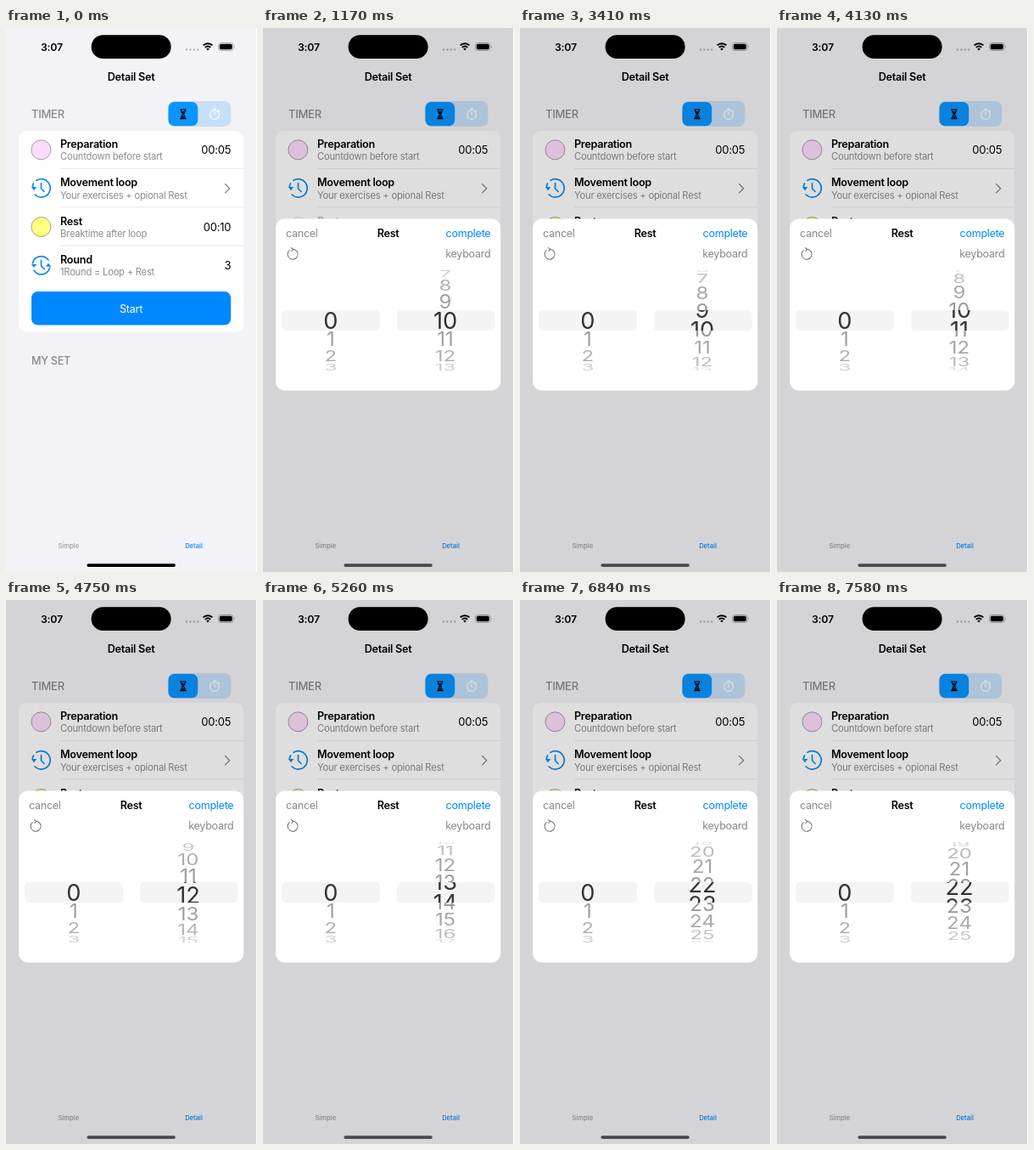
An HTML page that plays this animation: 296x640 px, repeating every 7990 ms.

```html
<!DOCTYPE html>
<html lang="en">
<head>
<meta charset="utf-8">
<title>Detail Set</title>
<style>
  html, body { margin: 0; width: 100%; height: 100%; overflow: hidden; background: #fff; }
  svg { display: block; }
  text { font: 12.6px Inter, sans-serif; letter-spacing: -.02em; }
  .bold { font-weight: 600; }
  .sub { font-size: 11.2px; fill: #8c8c90; }
  .head { font-weight: 500; fill: #88888c; }
  .tab { font-size: 7.6px; font-weight: 500; letter-spacing: 0; }
  .action { font-size: 12.5px; }
  .value { font-size: 13px; letter-spacing: -.015em; }
  .grey { fill: #88888c; }
  .blue { fill: #0088ff; }
  .end { text-anchor: end; }
  .mid, .wheel text { text-anchor: middle; }
  .line { fill: none; stroke-linecap: round; stroke-linejoin: round; }
  .icon { stroke: #0a8bea; stroke-width: 1.7; }
  .wheel text { letter-spacing: 0; fill: #333; }
</style>
</head>
<body>
<svg width="296" height="640" viewBox="0 0 296 640">
  <defs>
    <clipPath id="outside"><path d="M15 285h265v47H15zM15 356h265v47H15z"/></clipPath>
    <clipPath id="lens"><path d="M15 332h265v24H15z"/></clipPath>
    <path id="hands" class="line icon" d="M0 -6V.5L3.5 4"/>
  </defs>

  <rect width="295" height="640" fill="#f3f3f7"/>

  <!-- status bar -->
  <text class="bold" x="41" y="26.5" style="font-size:12.3px">3:07</text>
  <rect x="100.6" y="8.3" width="94" height="27.8" rx="13.9"/>
  <path class="line" d="M213 25.5h13.6" stroke="#b4b4b8" stroke-width="2.4" stroke-dasharray="0 4.4"/>
  <path d="M232.6 20.4a7.6 7.6 0 0 1 10.8 0M234.8 22.9a4.6 4.6 0 0 1 6.4 0" fill="none" stroke="#000" stroke-width="2"/>
  <path d="M236.2 24.4q1.8 -1.5 3.6 0L238 26.4z"/>
  <rect x="250.5" y="17.5" width="17.5" height="9" rx="2.8" fill="none" stroke="#99999c" stroke-width=".8"/>
  <rect x="251.8" y="18.8" width="14.9" height="6.4" rx="1.8"/>
  <path d="M269 20.5q1.6 1.5 0 3z" fill="#99999c"/>

  <text class="bold mid" x="147.6" y="61.5">Detail Set</text>
  <text class="head" x="30" y="106" style="font-size:13px">TIMER</text>

  <!-- mode switch -->
  <rect x="190.8" y="86" width="74.6" height="30" rx="8" fill="#c7e0f9"/>
  <rect x="191.5" y="87" width="34.7" height="28.2" rx="7" fill="#0a94ff"/>
  <g class="line" stroke="#000" stroke-width="1.1">
    <path d="M205.6 96h6.6M205.6 106.6h6.6M206.5 96.4c0 3.2 1.7 3.8 2 4.9c-.3 1.1-2 1.7-2 4.9M211.3 96.4c0 3.2-1.7 3.8-2 4.9c.3 1.1 2 1.7 2 4.9"/>
    <path d="M207.4 98.4h3L208.9 100zM207 105.8l1.9-2.2 1.9 2.2z" fill="#000" stroke-width=".7"/>
  </g>
  <g class="line" stroke="#fff" stroke-width="1.2">
    <circle cx="246" cy="102" r="5.4"/>
    <path d="M246 99v3.2M244.5 95h3M246 95v1.5M250.3 97l1 1"/>
  </g>

  <!-- settings card -->
  <rect x="15" y="121" width="265.2" height="237" rx="9" fill="#fff"/>
  <path d="M64 165.5H280M64 210.8H280M64 256.1H280" stroke="#e4e4e7" stroke-width=".8"/>

  <circle cx="41.4" cy="143.3" r="11.5" fill="#fcdcfc" stroke="#8a8a8a" stroke-width=".8"/>
  <text class="bold" x="64" y="140.9">Preparation</text>
  <text class="sub" x="64" y="155.2">Countdown before start</text>
  <text class="value end" x="265.4" y="148">00:05</text>

  <use href="#hands" x="41.5" y="188.5"/>
  <path class="line icon" d="M36 179.3a10.7 10.7 0 1 1 -2 16.7M31.3 186.5q.3 -2 1.2 -3.6"/>
  <path d="M29.8 187h6.4l-3.2 4.3z" fill="#0a8bea"/>
  <text class="bold" x="64" y="186.3">Movement loop</text>
  <text class="sub" x="64" y="200.6">Your exercises + opional Rest</text>
  <path class="line" d="M258.5 183.5l5.2 5.2l-5.2 5.2" stroke="#88888c" stroke-width="1.3"/>

  <g id="restRow">
    <circle cx="41.4" cy="234" r="11.5" fill="#ffff80" stroke="#8a8a8a" stroke-width=".8"/>
    <text class="bold" x="64" y="231.6">Rest</text>
    <text class="sub" x="64" y="245.9">Breaktime after loop</text>
    <text class="value end" x="265.4" y="238.8">00:10</text>
  </g>

  <use href="#hands" x="41.5" y="279.3"/>
  <path class="line icon" d="M31.4 276.5a10.4 10.4 0 0 1 18.5 -3.5M51.6 282a10.4 10.4 0 0 1 -18.5 3.5"/>
  <path d="M29.8 277.8h6.4l-3.2 4.3zM46.8 280.8h6.4l-3.2 -4.3z" fill="#0a8bea"/>
  <text class="bold" x="64" y="277">Round</text>
  <text class="sub" x="64" y="291.2">1Round = Loop + Rest</text>
  <text class="value end" x="265.4" y="284.2">3</text>

  <rect class="blue" x="30" y="310" width="235.2" height="39.5" rx="7.5"/>
  <text class="mid" x="147.6" y="334.5" fill="#fff">Start</text>

  <text class="head" x="30" y="396">MY SET</text>
  <text class="tab mid" x="73.8" y="611.5" fill="#98989c">Simple</text>
  <text class="tab mid blue" x="221.5" y="611.5">Detail</text>
  <rect id="homeBar" x="95.4" y="630.2" width="104.4" height="3.8" rx="1.9"/>

  <!-- picker sheet -->
  <g id="sheet">
    <rect width="295" height="640" opacity=".13"/>
    <rect x="15" y="224.5" width="265.2" height="202" rx="11" fill="#fff"/>
    <text class="action grey" x="27" y="246">cancel</text>
    <text class="bold mid" x="147.6" y="246">Rest</text>
    <text class="action blue end" x="268.4" y="246">complete</text>
    <text class="action grey end" x="268.4" y="270.3">keyboard</text>
    <g class="line" stroke="#77777b" stroke-width="1.1">
      <path d="M31.2 261.6a6 6 0 1 0 4.2 -1.4"/>
      <path d="M33.4 258.6l2.2 1.7l-1.8 2"/>
    </g>
    <rect x="22" y="332" width="116" height="24" rx="5" fill="#f4f4f5"/>
    <rect x="158" y="332" width="115.5" height="24" rx="5" fill="#f4f4f5"/>
    <g class="wheel" id="far" clip-path="url(#outside)"></g>
    <g class="wheel" id="near" clip-path="url(#lens)"></g>
  </g>
</svg>

<script>
const LOOP = 7990, OPEN = 1170, OPENED = 1720;
const STEP_ANGLE = 0.367, CENTER = 344;
const el = id => document.getElementById(id);

// [first update, last update, number of updates]
const bursts = [
  [2890, 3130, 3], [3280, 3870, 6], [4010, 4580, 6], [4750, 4870, 2], [5030, 5370, 4],
  [5580, 5580, 1], [6120, 6120, 1], [6270, 6610, 4], [6840, 6840, 1], [7240, 7580, 4]
];

// [time, seconds value on the wheel]
const drag = [
  [2770, 10], [3130, 9.65], [3410, 9.52], [4010, 10.3], [4750, 11.86], [5370, 13.88],
  [5580, 14], [6000, 14], [6120, 13.87], [6270, 15.2], [6490, 20.6], [6610, 21.9],
  [6840, 22.4], [7200, 22.4], [7580, 22.3]
];

function lastUpdate(t) {
  let last = 0;
  for (const [from, to, count] of bursts) {
    if (t < from) break;
    const gap = (to - from) / Math.max(1, count - 1);
    last = gap ? from + Math.min(count - 1, Math.floor((t - from) / gap)) * gap : from;
  }
  return last;
}

function wheelValue(t) {
  const next = drag.findIndex(key => key[0] > t);
  if (next === 0) return drag[0][1];
  if (next < 0) return drag.at(-1)[1];
  const [t0, v0] = drag[next - 1], [t1, v1] = drag[next];
  return v0 + (v1 - v0) * (t - t0) / (t1 - t0);
}

// Numbers on a cylinder seen from the front
function wheel(x, value, size, radius, strength) {
  let rows = '';
  for (let n = Math.max(0, Math.ceil(value - 3.8)); n <= value + 3.8; n++) {
    const angle = (n - value) * STEP_ANGLE, depth = Math.cos(angle);
    const y = CENTER + radius * Math.sin(angle);
    rows += `<text transform="translate(${x} ${y}) scale(1 ${depth})" y="${size * .364}"
      style="font-size:${size}px" opacity="${strength * depth ** .9}">${n}</text>`;
  }
  return rows;
}

function columns(value, ...look) {
  return wheel(79.8, 0, ...look) + wheel(215, value, ...look);
}

function draw() {
  const t = performance.now() % LOOP;
  const open = t >= OPEN;
  el('sheet').style.display = open ? '' : 'none';
  el('homeBar').setAttribute('fill', open ? '#55555a' : '#000');
  el('restRow').setAttribute('opacity', open ? Math.min(1, .3 + .7 * (t - OPEN) / (OPENED - OPEN)) : 1);
  const value = wheelValue(lastUpdate(t));
  el('far').innerHTML = columns(value, 24, 61.5, .5);
  el('near').innerHTML = columns(value, 27.2, 66, 1);
  requestAnimationFrame(draw);
}
draw();
</script>
</body>
</html>
```
